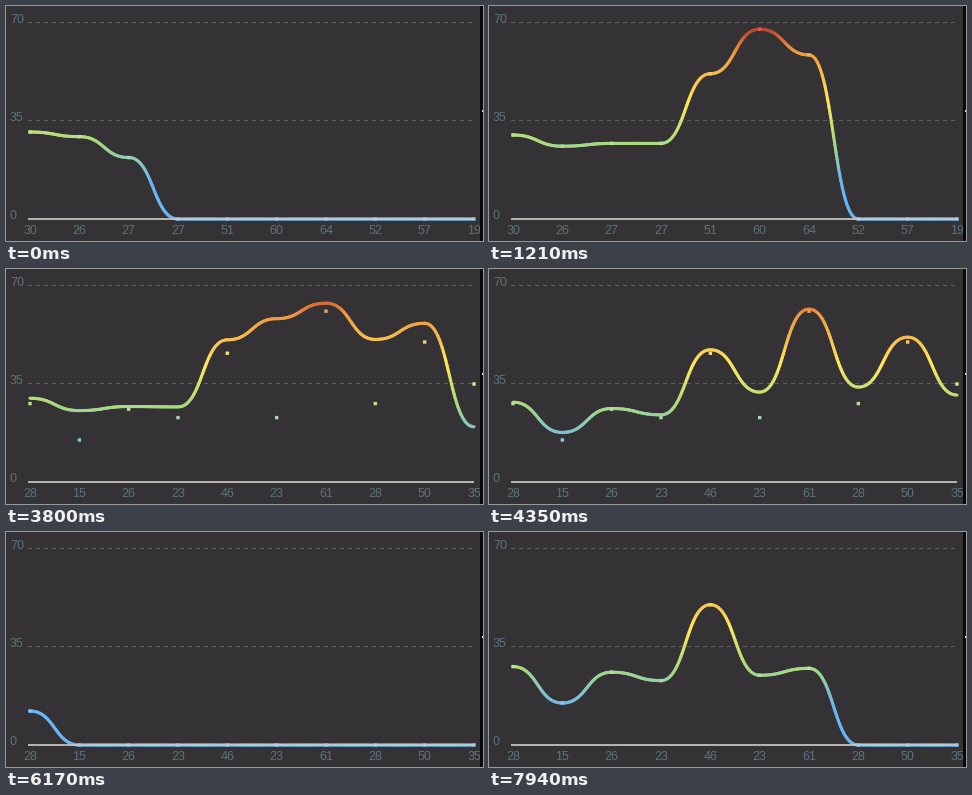
A matplotlib script for the animation above (8 s loop, 477 px wide and 235 px high).

```python
import numpy as np
import matplotlib.pyplot as plt
from matplotlib.animation import FuncAnimation
from matplotlib.collections import LineCollection
from matplotlib.colors import to_rgb
from matplotlib.patches import Rectangle

W, H, DPI = 477, 235, 64
PT = 72 / DPI                     # points per pixel
STEP, LOOP = 20, 8000             # ms
MORPH, REPLAY = 3800, 6170        # ms, when the second and third parts begin
PITCH = 136                       # ms between redraws of the chart
STAGGER, RISE, BLEND = 294, 949, 1020

FIRST = np.array([30, 26, 27, 27, 51, 60, 64, 52, 57, 19])
SECOND = np.array([28, 15, 26, 23, 46, 23, 61, 28, 50, 35])
XS = np.linspace(24, 468, 10)
BACK, TEXT, GRID, AXIS = "#343234", "#5d727c", "#5b5f5d", "#cbcac4"

# Line colour by chart value
SCALE = {13: "#69b6f6", 27: "#a6da80", 42: "#ffe85a", 60: "#ee963e", 68: "#b8422f"}
CHANNELS = np.transpose([to_rgb(c) for c in SCALE.values()])


def to_y(value):
    return 213 - 2.8 * np.asarray(value)


def colour(value):
    return np.stack([np.interp(value, list(SCALE), c) for c in CHANNELS], axis=-1)


def overshoot(x):
    v = np.clip(x, 0, 1) - 1
    return 1 + 3 * v**3 + 2 * v**2


def rise(data, clock):
    """Points spring up one after another."""
    return data * overshoot((clock - STAGGER * np.arange(10)) / RISE)


def state(t):
    """Labels' data, dot values and line values at time t."""
    start = max(s for s in (0, MORPH, REPLAY) if s <= t)
    held = PITCH * ((t - start + 30) // PITCH)
    if start == MORPH:
        x = min((held + 139) / BLEND, 1)
        ease = (1 - np.cos(np.pi * x)) / 2
        return SECOND, SECOND, FIRST + (SECOND - FIRST) * ease
    data, lead = (SECOND, 95) if start == REPLAY else (FIRST, 805)
    line = rise(data, held + lead)
    return data, line, line


S = np.linspace(0, 1, 33)[:-1]
EASE_X = 1.5 * S * (1 - S) + S**3   # Bezier with handles at mid x
EASE_Y = 3 * S**2 - 2 * S**3


def between(points, ease):
    inner = points[:-1, None] + np.diff(points)[:, None] * ease
    return np.append(inner.ravel(), points[-1])


CURVE_X = between(XS, EASE_X)

fig = plt.figure(figsize=(W / DPI, H / DPI), dpi=DPI, facecolor=BACK)
ax = fig.add_axes([0, 0, 1, 1])
ax.set(xlim=(0, W), ylim=(H, 0))
ax.axis("off")

font = dict(family="Liberation Sans", size=12.5 * PT, color=TEXT, va="baseline")
for value in (70, 35, 0):
    y = to_y(value) - 0.5
    ax.text(4, y + 0.5, str(value), ha="left", **font)
    if value:
        ax.plot([22, 468], [y, y], color=GRID, lw=PT, dashes=(4, 4),
                dash_capstyle="butt", snap=False, zorder=1)
ax.plot([22, 468], [213, 213], color=AXIS, lw=1.7 * PT,
        solid_capstyle="butt", snap=False, zorder=5)
ax.add_patch(Rectangle((474, 0), 3, H, fc="#080808", lw=0, zorder=6))
ax.add_patch(Rectangle((475.5, 103.5), 1.5, 2, fc="#e8e8e8", lw=0, zorder=7))

labels = [ax.text(x, 228, "", ha="center", **font) for x in XS]
curve = ax.add_collection(LineCollection(
    [], linewidths=3.1 * PT, capstyle="round", snap=False, zorder=3))
dots = ax.scatter(XS, XS, s=(3.4 * PT)**2, marker="s", linewidths=0,
                  snap=False, zorder=4)


def draw(i):
    data, points, line = state(i * STEP + STEP / 2)
    for label, value in zip(labels, data):
        label.set_text(str(value))
    v = between(line, EASE_Y)
    xy = np.column_stack([CURVE_X, to_y(v)])
    curve.set_segments(np.stack([xy[:-1], xy[1:]], axis=1))
    curve.set_color(colour((v[:-1] + v[1:]) / 2))
    dots.set_offsets(np.column_stack([XS, to_y(points)]))
    dots.set_facecolor(colour(points) * 0.82 + 0.18)
    return [curve, dots, *labels]


anim = FuncAnimation(fig, draw, frames=LOOP // STEP, interval=STEP,
                     repeat=True, repeat_delay=0, blit=False)
plt.show()
```
